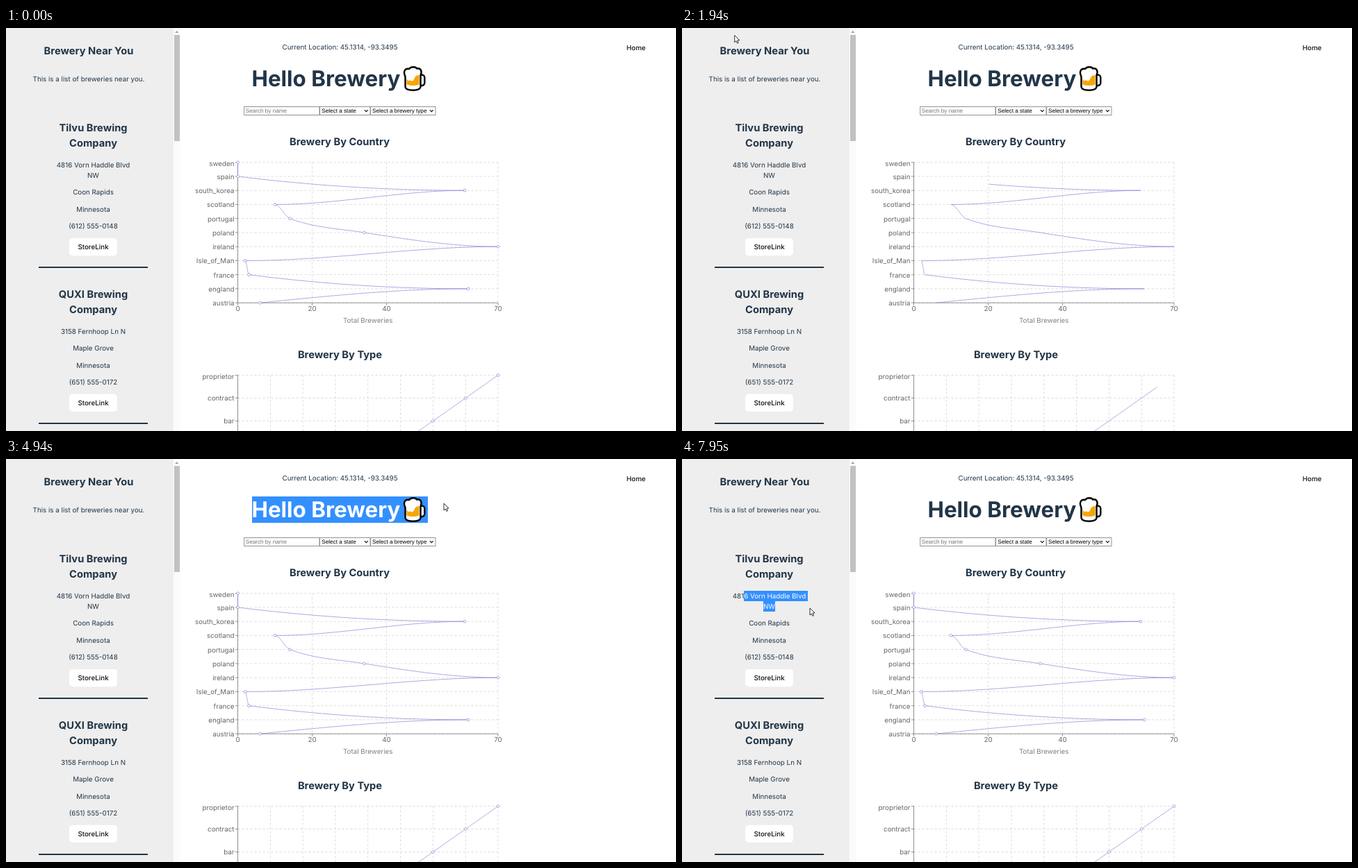
Animation, 964 px wide and 581 px high, one loop 8000 ms. Source, as an HTML page with a canvas:

```html
<!DOCTYPE html>
<html lang="en">
<head>
<meta charset="utf-8">
<title>Brewery dashboard</title>
<style>
  html, body { margin: 0; width: 100%; height: 100%; overflow: hidden; background: #fff; }
  canvas { display: block; }
</style>
</head>
<body>
<canvas id="stage" width="964" height="581"></canvas>
<script>
const ctx = document.getElementById('stage').getContext('2d');
ctx.textRendering = 'geometricPrecision';
const LOOP = 8000;
const ZOOM = 0.6125;
const BODY = 16 * ZOOM, H2 = 24 * ZOOM, H1 = 51.2 * ZOOM;
const SANS = 'Inter, sans-serif';
const FORM = '"Liberation Sans", Arial, sans-serif';
const INK = '#213547', GREY = '#666', LINE = '#8884d8', BLUE = '#3390ff';
const LOAD = 780, READY = 930, DRAW = 912, DRAW_MS = 1500;

// Screen updates: [first time, count], 120 ms apart within a run.
const RUNS = [[0, 1], [780, 1], [930, 5], [1560, 3], [1940, 5], [2570, 1], [2720, 5], [3350, 1],
  [3500, 4], [4010, 1], [4160, 2], [4430, 4], [4940, 1], [5090, 2], [5360, 7], [6200, 2],
  [6470, 4], [6980, 7], [7830, 2]];
const STEPS = RUNS.flatMap(([start, n]) => Array.from({ length: n }, (_, i) => start + i * 120));

const clamp = v => Math.max(0, Math.min(1, v));
const lerp = (a, b, k) => a + (b - a) * k;

// CSS "ease", solved by bisection
function ease(x) {
  if (x <= 0 || x >= 1) return clamp(x);
  const bez = (a, b, s) => 3 * (1 - s) ** 2 * s * a + 3 * (1 - s) * s * s * b + s ** 3;
  let lo = 0, hi = 1;
  for (let i = 0; i < 24; i++) {
    const mid = (lo + hi) / 2;
    if (bez(0.25, 0.25, mid) < x) lo = mid; else hi = mid;
  }
  return bez(0.1, 1, lo);
}

// ---- text -------------------------------------------------------------

let tint = null;

function font(size, weight = 400, family = SANS) {
  ctx.font = `${weight} ${size}px ${family}`;
}

// y is the middle of the capitals
function text(str, x, y, { size = BODY, weight = 400, color = INK, align = 'center', family = SANS } = {}) {
  font(size, weight, family);
  ctx.textAlign = align;
  ctx.fillStyle = tint || color;
  ctx.fillText(str, x, y + size * 0.364);
}

function width(str, size, weight) {
  font(size, weight);
  return ctx.measureText(str).width;
}

const bold = size => ({ size, weight: 700 });
const heading = (str, x, y) => text(str, x, y, bold(H2));

// ---- sidebar ----------------------------------------------------------

const SIDE = 125.5;
const BREWERIES = [
  { y: 144, name: 'Tilvu Brewing', street: ['4816 Vorn Haddle Blvd', 'NW'], city: 'Coon Rapids', phone: '(612) 555-0148' },
  { y: 383.5, name: 'QUXI Brewing', street: ['3158 Fernhoop Ln N'], city: 'Maple Grove', phone: '(651) 555-0172' }
];

function card({ y, name, street, city, phone }) {
  heading(name, SIDE, y);
  heading('Company', SIDE, y + 22);
  street.forEach((s, i) => text(s, SIDE, y + 53.5 + i * 14.7));
  const end = y + 53.5 + (street.length - 1) * 14.7;
  [city, 'Minnesota', phone].forEach((s, i) => text(s, SIDE, end + 24.5 * (i + 1)));
  if (!tint) {
    ctx.fillStyle = '#fff';
    ctx.beginPath();
    ctx.roundRect(91, end + 90.7, 69, 25.3, 5);
    ctx.fill();
    ctx.fillStyle = INK;
    ctx.fillRect(47, Math.round(end + 131.5), 157, 2);
  }
  text('StoreLink', SIDE, end + 103.3, { weight: 500, color: '#111' });
}

function scrollbar() {
  ctx.fillStyle = '#fbfbfb';
  ctx.fillRect(241, 0, 9.5, 581);
  ctx.fillStyle = '#c1c1c1';
  ctx.fillRect(242, 10, 8, 153);
  ctx.fillStyle = '#a0a0a0';
  ctx.beginPath();
  ctx.moveTo(243.2, 7);
  ctx.lineTo(245.8, 4);
  ctx.lineTo(248.4, 7);
  ctx.fill();
}

// ---- charts -----------------------------------------------------------

const LEFT = 333.5, RIGHT = 708;
const COUNTRIES = ['austria', 'england', 'france', 'Isle_of_Man', 'ireland', 'poland',
  'portugal', 'scotland', 'south_korea', 'spain', 'sweden'];
const COUNTS = [6, 62, 3, 2, 70, 34, 14, 10, 61, 0, 0];
const scaleX = v => lerp(LEFT, RIGHT, v / 70);
const rowY = i => 396.2 - i * 20.25;

const countryPts = COUNTS.map((v, i) => [scaleX(v), rowY(i)]);
const typePts = Array.from({ length: 9 }, (_, i) => [lerp(LEFT, RIGHT, i / 8), 500.5 + (8 - i) * 33]);

// Monotone cubic through the points, sampled to a polyline with lengths
function trace(pts) {
  const n = pts.length - 1;
  const h = i => pts[i + 1][0] - pts[i][0];
  // a vertical step keeps the direction of the step before it
  const s = i => (pts[i + 1][1] - pts[i][1]) / (h(i) || (i > 0 && h(i - 1) < 0 ? -0 : 0));
  const slope = i => {
    if (Math.sign(s(i - 1)) !== Math.sign(s(i))) return 0;
    const p = (s(i - 1) * h(i) + s(i) * h(i - 1)) / (h(i - 1) + h(i));
    return 2 * Math.sign(s(i)) * Math.min(Math.abs(s(i - 1)), Math.abs(s(i)), Math.abs(p) / 2);
  };
  const m = pts.map((_, i) => i > 0 && i < n ? slope(i) : 0);
  const end = (i, t) => h(i) ? (3 * s(i) - t) / 2 : t;
  m[0] = end(0, m[1]);
  m[n] = end(n - 1, m[n - 1]);

  const out = [[...pts[0], 0]];
  for (let i = 0; i < n; i++) {
    const [x0, y0] = pts[i], [x1, y1] = pts[i + 1], d = (x1 - x0) / 3;
    for (let k = 1; k <= 30; k++) {
      const u = k / 30, v = 1 - u;
      const x = lerp(x0, x1, u);
      const y = v ** 3 * y0 + 3 * v * v * u * (y0 + d * m[i]) + 3 * v * u * u * (y1 - d * m[i + 1]) + u ** 3 * y1;
      const [px, py, len] = out[out.length - 1];
      out.push([x, y, len + Math.hypot(x - px, y - py)]);
    }
  }
  return out;
}

const SERIES = [countryPts, typePts].map(pts => ({ pts, path: trace(pts) }));

function series({ pts, path }, part) {
  const limit = path[path.length - 1][2] * part;
  ctx.strokeStyle = LINE;
  ctx.lineWidth = 0.7;
  ctx.beginPath();
  ctx.moveTo(path[0][0], path[0][1]);
  for (let i = 1; i < path.length; i++) {
    const [x, y, len] = path[i], [px, py, before] = path[i - 1];
    if (len > limit) {
      const k = (limit - before) / (len - before);
      ctx.lineTo(lerp(px, x, k), lerp(py, y, k));
      break;
    }
    ctx.lineTo(x, y);
  }
  ctx.stroke();
  if (part < 1) return;
  ctx.fillStyle = '#fff';
  for (const [x, y] of pts) {
    ctx.beginPath();
    ctx.arc(x, y, 1.9, 0, 7);
    ctx.fill();
    ctx.stroke();
  }
}

function segment(x0, y0, x1, y1) {
  ctx.beginPath();
  ctx.moveTo(x0, y0);
  ctx.lineTo(x1, y1);
  ctx.stroke();
}

function frame(xs, ys, top, bottom) {
  ctx.strokeStyle = '#ccc';
  ctx.lineWidth = 0.7;
  ctx.setLineDash([3, 3]);
  ys.forEach(y => segment(LEFT, y, RIGHT, y));
  xs.forEach(x => segment(x, top, x, bottom));
  ctx.setLineDash([]);
  ctx.strokeStyle = GREY;
  segment(LEFT, top, LEFT, bottom);
  segment(LEFT, bottom, RIGHT, bottom);
  ys.forEach(y => segment(LEFT - 3.7, y, LEFT, y));
  xs.forEach(x => segment(x, bottom, x, bottom + 3.7));
}

function charts(part) {
  frame([0, 20, 40, 70].map(scaleX), COUNTRIES.map((_, i) => rowY(i)), 193.7, 396.2);
  frame(typePts.map(p => p[0]), typePts.map(p => p[1]), 500.5, 764.5);
  SERIES.forEach(s => series(s, part));
}

function chartText() {
  const tick = { color: GREY, align: 'right' };
  heading('Brewery By Country', 480, 163.5);
  COUNTRIES.forEach((c, i) => text(c, 328.5, rowY(i) + (i === 10 ? 1.5 : 0.3), tick));
  [0, 20, 40, 70].forEach(v => text(v, scaleX(v), 404.8, { color: GREY }));
  text('Total Breweries', 520.7, 421, { color: '#808080' });
  heading('Brewery By Type', 480.5, 470.5);
  ['proprietor', 'contract', 'bar'].forEach((c, i) => text(c, 328.5, 500.8 + 33 * i + (i ? 0 : 1.3), tick));
}

// ---- header -----------------------------------------------------------

const TITLE_X = 353.5, TITLE_Y = 72.8;

function mug() {
  ctx.lineJoin = 'round';
  ctx.strokeStyle = '#000';
  ctx.lineWidth = 2.4;
  ctx.beginPath();
  ctx.roundRect(592, 67.5, 10.3, 15.5, 4);
  ctx.fillStyle = '#fff';
  ctx.fill();
  ctx.stroke();

  ctx.beginPath();
  ctx.moveTo(574.5, 70);
  ctx.bezierCurveTo(571, 63, 574, 57.5, 580, 59);
  ctx.bezierCurveTo(583, 55, 590, 56, 591, 58.5);
  ctx.bezierCurveTo(597, 57, 599, 63, 596.5, 68);
  ctx.lineTo(596.5, 85);
  ctx.quadraticCurveTo(595.5, 89.7, 585.5, 89.7);
  ctx.quadraticCurveTo(575.5, 89.7, 574.5, 85);
  ctx.closePath();
  ctx.fill();
  ctx.stroke();

  ctx.fillStyle = '#f7a600';
  ctx.beginPath();
  ctx.moveTo(576.5, 73);
  ctx.quadraticCurveTo(579, 78, 581.5, 75);
  ctx.quadraticCurveTo(585, 79, 587.5, 73);
  ctx.quadraticCurveTo(588.5, 68, 594.5, 68);
  ctx.lineTo(594.5, 81.5);
  ctx.quadraticCurveTo(585.5, 84.5, 576.5, 81.5);
  ctx.fill();
}

function box(x, y, w, h) {
  ctx.fillStyle = '#fff';
  ctx.fillRect(x, y, w, h);
  ctx.strokeStyle = '#767676';
  ctx.lineWidth = 0.8;
  ctx.strokeRect(x, y, w, h);
}

function chevron(x) {
  ctx.strokeStyle = '#111';
  ctx.lineWidth = 1.2;
  ctx.beginPath();
  ctx.moveTo(x - 2.4, 118.2);
  ctx.lineTo(x, 120.6);
  ctx.lineTo(x + 2.4, 118.2);
  ctx.stroke();
}

function filters() {
  const opt = { size: 13.333 * ZOOM, family: FORM, align: 'left', color: '#000' };
  box(342.7, 113.5, 108.3, 12);
  box(451.5, 113.5, 72.5, 12);
  box(524.7, 113.5, 93.3, 12);
  text('Search by name', 344.7, 119.5, { ...opt, color: '#757575' });
  text('Select a state', 454.3, 119.5, opt);
  text('Select a brewery type', 527, 119.5, opt);
  chevron(518.3);
  chevron(612.3);
}

const LOCATION = 'Current Location: 45.1314, -93.3495';

function headerText(shift) {
  heading('Brewery Near You', 119 + shift, 32.3);
  text('This is a list of breweries near you.', 119 + shift, 73.5);
  text(LOCATION, 480.5, 27.5);
  text('Home', 906.5 + shift * 2, 28.5, { weight: 500, color: '#111' });
  text('Hello Brewery', TITLE_X, TITLE_Y, { ...bold(H1), align: 'left' });
}

function allText() {
  headerText(0);
  chartText();
  BREWERIES.forEach(card);
}

// ---- selection --------------------------------------------------------

function span(str, cx, y, size, weight) {
  const w = width(str, size, weight);
  return { a: cx - w / 2, b: cx + w / 2, y, h: size * 1.5 };
}

function ranges() {
  const first = BREWERIES[0], [road, suffix] = first.street;
  const near = span('Brewery Near You', 119, 32.3, H2, 700);
  const title = { a: TITLE_X, b: 607, y: TITLE_Y, h: 38 };
  const place = span(LOCATION, 480.5, 27.5, BODY, 400);
  const name = span(first.name, SIDE, first.y, H2, 700);
  const company = span('Company', SIDE, first.y + 22, H2, 700);
  const street = span(road, SIDE, first.y + 53.5, BODY, 400);
  street.a += width(road.slice(0, 3), BODY, 400);
  street.b += width(' ', BODY, 400);
  const tail = span(suffix, SIDE, first.y + 68.2, BODY, 400);
  [place.a, place.b] = [place.b, place.a];
  // [range, drag start, fully selected, cleared]
  return [
    [near, 3200, 3430, 4430],
    [title, 4430, 4700, 5360],
    [place, 5360, 5985, 6980],
    [name, 6860, 7160, 7580],
    [company, 7160, 7220, 7580],
    [street, 7690, 7830, LOOP],
    [tail, 7780, 7830, LOOP]
  ];
}

function selections(t) {
  for (const [r, from, full, until] of ranges()) {
    if (t <= from || t >= until) continue;
    const x = lerp(r.a, r.b, clamp((t - from) / (full - from)));
    const [left, right, top, bottom] =
      [Math.min(r.a, x), Math.max(r.a, x), r.y - r.h / 2, r.y + r.h / 2].map(Math.round);
    ctx.save();
    ctx.beginPath();
    ctx.rect(left, top, right - left, bottom - top);
    ctx.clip();
    ctx.fillStyle = BLUE;
    ctx.fillRect(0, 0, 964, 581);
    tint = '#fff';
    allText();
    tint = null;
    ctx.restore();
  }
}

// ---- pointer ----------------------------------------------------------

const PATH = [
  [1560, 76, 0], [1800, 73, 2], [2060, 78, 18], [2420, 107, 45], [2570, 91, 37], [2720, 70, 45],
  [2840, 49, 45], [3080, 52, 36], [3200, 60, 27], [3350, 143, 33], [3500, 189, 35], [3860, 292, 47],
  [4010, 331, 70], [4160, 340, 66], [4280, 326, 62], [4430, 405, 83], [4670, 600, 84], [4790, 668, 86],
  [4940, 630, 64], [5090, 606, 45], [5210, 587, 27], [5360, 564, 27], [5960, 404, 23], [6080, 365, 32],
  [6200, 250, 76], [6320, 147, 99], [6470, 120, 112], [6830, 70, 136], [6980, 116, 143], [7100, 158, 148],
  [7220, 176, 166], [7340, 140, 184], [7460, 98, 195], [7580, 89, 198], [7700, 97, 200],
  [7830, 160, 211], [7950, 184, 215]
];
// Periods in which the pointer rests on text
const BEAM = [[2570, 2700], [3180, 3600], [4430, 4600], [5360, 6000], [6980, 7200], [7460, 7800]];

function arrow(x, y) {
  ctx.beginPath();
  [[0, 0], [0, 10], [2.3, 8], [3.8, 11.4], [5.5, 10.6], [4, 7.3], [7, 7]].forEach(([dx, dy]) => ctx.lineTo(x + dx, y + dy));
  ctx.closePath();
  ctx.fillStyle = '#fff';
  ctx.fill();
  ctx.strokeStyle = '#000';
  ctx.lineWidth = 0.8;
  ctx.stroke();
}

function beam(x, y) {
  ctx.fillStyle = '#222';
  ctx.fillRect(x - 0.5, y - 5, 1, 10.5);
  for (const dy of [-5.5, 5]) {
    ctx.fillRect(x - 2.5, y + dy, 2, 0.9);
    ctx.fillRect(x + 0.5, y + dy, 2, 0.9);
  }
}

function pointer(t) {
  if (t < PATH[0][0]) return;
  const next = PATH.findIndex(p => p[0] > t);
  const i = next < 0 ? PATH.length - 1 : next;
  const [t0, x0, y0] = PATH[i - 1], [t1, x1, y1] = PATH[i];
  const k = clamp((t - t0) / (t1 - t0));
  const shape = BEAM.some(([a, b]) => t >= a && t < b) ? beam : arrow;
  shape(lerp(x0, x1, k), lerp(y0, y1, k));
}

// ---- page -------------------------------------------------------------

function draw(t) {
  const loading = t >= LOAD && t < READY;
  ctx.fillStyle = '#fff';
  ctx.fillRect(0, 0, 964, 581);
  ctx.fillStyle = '#eee';
  ctx.fillRect(0, 0, loading ? 250 : 241, 581);
  filters();
  if (loading) {
    headerText(5);
  } else {
    scrollbar();
    charts(t < LOAD ? 1 : ease((t - DRAW) / DRAW_MS));
    allText();
    selections(t);
  }
  mug();
  pointer(t);
}

const start = performance.now();
let shown = -1;

function tick() {
  const now = (performance.now() - start) % LOOP;
  const t = STEPS.filter(s => s <= now).pop();
  if (t !== shown) draw(shown = t);
  requestAnimationFrame(tick);
}
tick();
</script>
</body>
</html>
```
